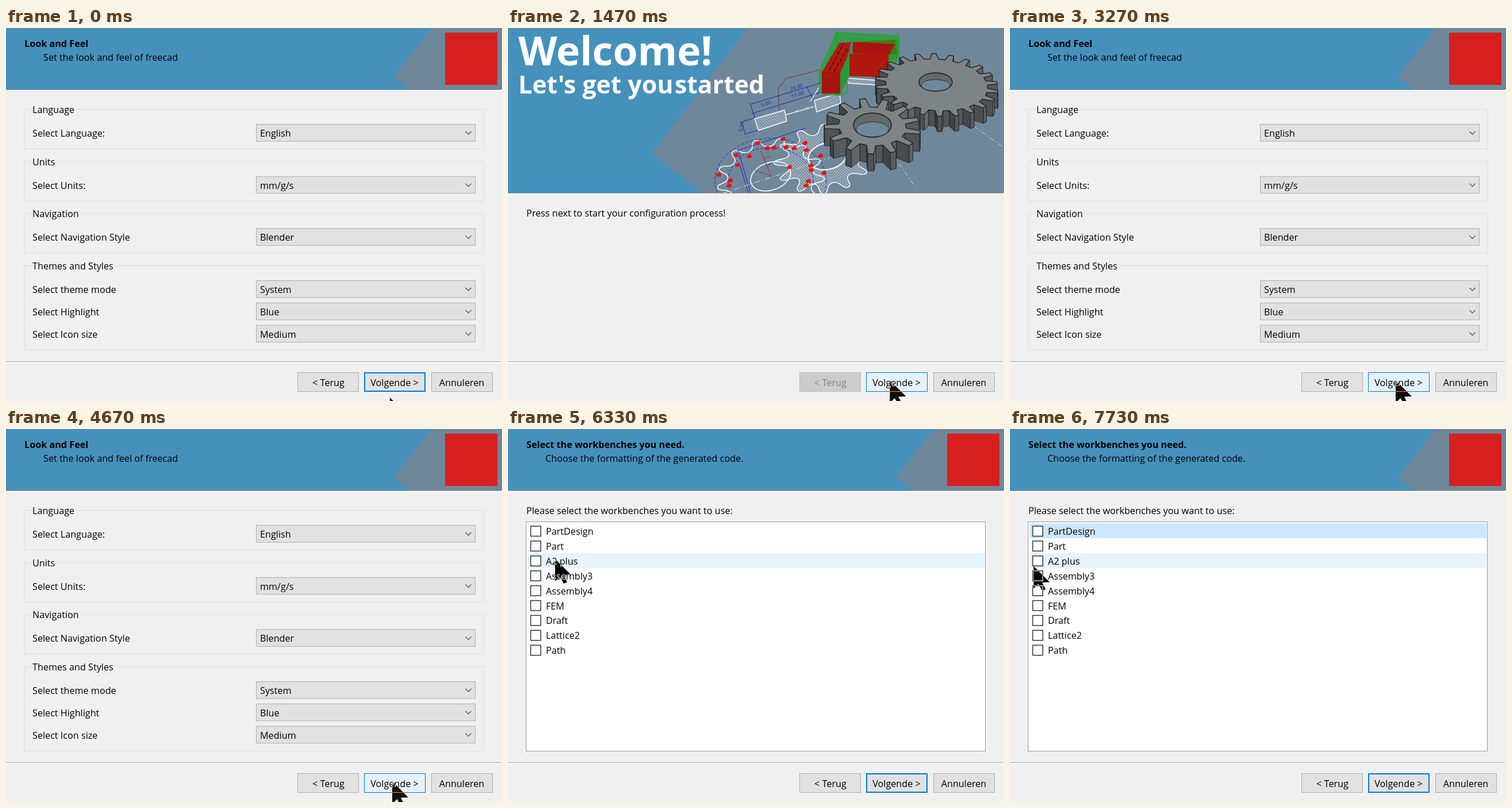
Animation, 863 px wide and 649 px high, one loop 8000 ms. Source, as an HTML page:

```html
<!DOCTYPE html>
<html lang="en">
<head>
<meta charset="utf-8">
<title>Setup wizard</title>
<style>
  html, body { margin: 0; width: 100%; height: 100%; overflow: hidden; background: #f0f0f0; }
  svg { display: block; width: 863px; height: 649px; }
  text { font: 16.2px "Open Sans", "Noto Sans", sans-serif; white-space: pre; }
  .bold { font-weight: 700; }
  .banner { font-weight: 700; fill: #fff; }
  .title { stroke: #f0f0f0; stroke-width: 7px; paint-order: stroke; }
  .dim { font-size: 9px; fill: #2525b0; }
  .mid { text-anchor: middle; }
  #cursor { mix-blend-mode: difference; }
</style>
</head>
<body>
<svg id="stage" viewBox="0 0 863 649"></svg>
<script>
const LOOP = 8000;
const stage = document.getElementById('stage');
const $ = id => document.getElementById(id);

const rect = (x, y, w, h, fill, extra = '') =>
  `<rect x="${x}" y="${y}" width="${w}" height="${h}" fill="${fill}" ${extra}/>`;
const path = (d, fill, stroke = 'none', width = 1, extra = '') =>
  `<path d="${d}" fill="${fill}" stroke="${stroke}" stroke-width="${width}" ${extra}/>`;
const text = (x, y, s, attrs = '') =>
  `<text x="${x}" y="${y}" ${attrs}>${s.replace(/</g, '&lt;')}</text>`;
const poly = pts => 'M' + pts.map(p => p.map(v => v.toFixed(1)).join(' ')).join('L') + 'Z';
const line = (d, color, width = 1, dash = '') =>
  path(d, 'none', color, width, dash && `stroke-dasharray="${dash}"`);
const ellipse = (x, y, rx, ry, fill, stroke, width, extra = '') =>
  `<ellipse cx="${x}" cy="${y}" rx="${rx}" ry="${ry}" fill="${fill}" stroke="${stroke}" stroke-width="${width}" ${extra}/>`;
const rule = y => rect(0, y, 861, 1, '#a0a0a0') + rect(0, y + 1, 861, 1.5, '#fff');

// Gear outline on a tilted ellipse: root, two tip points, root for each tooth.
function gearPoints(cx, cy, rx, ry, teeth, root, tilt, phase = 0) {
  const pts = [], c = Math.cos(tilt), s = Math.sin(tilt);
  const profile = [[-.28, root], [-.13, 1], [.13, 1], [.28, root]];
  for (let i = 0; i < teeth; i++) {
    for (const [offset, r] of profile) {
      const a = (i + offset + phase) / teeth * 2 * Math.PI;
      const u = rx * r * Math.cos(a), v = ry * r * Math.sin(a);
      pts.push([cx + u * c - v * s, cy + u * s + v * c]);
    }
  }
  return pts;
}

function smooth(pts) {
  const mid = (a, b) => [(a[0] + b[0]) / 2, (a[1] + b[1]) / 2].map(v => v.toFixed(1)).join(' ');
  return `M${mid(pts[pts.length - 1], pts[0])}` +
    pts.map((p, i) => `Q${p[0].toFixed(1)} ${p[1].toFixed(1)} ${mid(p, pts[(i + 1) % pts.length])}`).join('') + 'Z';
}

function solidGear(pts, depth, hole) {
  const walls = pts.map((a, i) => {
    const b = pts[(i + 1) % pts.length];
    const slope = (b[1] - a[1]) / Math.hypot(b[0] - a[0], b[1] - a[1]);
    const g = Math.round(82 + 26 * slope);
    const quad = poly([a, b, [b[0], b[1] + depth], [a[0], a[1] + depth]]);
    return { y: a[1] + b[1], svg: path(quad, `rgb(${g},${g + 3},${g + 5})`, '#222527', 1) };
  }).sort((a, b) => a.y - b.y);
  const [x, y, rx, ry] = hole;
  return walls.map(w => w.svg).join('') +
    path(poly(pts), '#7e8386', '#1f2224', 1.3, 'stroke-linejoin="round"') +
    ellipse(x, y, rx, ry, '#65696c', '#1b1d1f', 1.5) +
    ellipse(x, y + ry * .35, rx * .86, ry * .62, '#6f879b', '#2a2d30', 1);
}

function sketch() {
  const dots = [[366, 256], [386, 266], [384, 275], [399, 239], [396, 222], [419, 224], [434, 201],
    [450, 210], [462, 209], [478, 194], [483, 208], [497, 210], [516, 201], [518, 213], [543, 223],
    [526, 240], [527, 248], [549, 253], [522, 267], [518, 275], [489, 243]];
  const ring = gearPoints(457, 262, 94, 70, 13, .8, -.1, .3);
  return ellipse(457, 266, 97, 74, 'none', '#2222b8', 1, 'stroke-dasharray="5 3"') +
    ellipse(457, 266, 74, 58, 'none', '#2222b8', 1, 'stroke-dasharray="4 3"') +
    line(smooth(ring), '#fff', 1.5) +
    ellipse(457, 258, 36, 24, 'none', '#fff', 1.5, 'transform="rotate(-20 457 258)"') +
    line('M400 213L518 174M400 211L422 287M404 240L418 287', '#2222b8') +
    line('M375 287L560 226', '#dfe5ea', 1, '9 4 2 4') +
    line('M440 214L458 258L430 247M446 226l12 -3M448 240l10 -4', '#a62d38', 1.2, '4 1') +
    path(dots.map(([x, y]) => `M${x - 3} ${y + 1}l5 -3l1 4`).join(''), 'none', '#f01010', 5, 'stroke-linejoin="round"');
}

function pocket() {
  let s = path('M545 113V76L574 24L676 20L678 52L664 56V86L594 84L578 117Z', '#4d8060') +
    path('M600 25L674 20L677 44L664 47L600 44Z', '#a8140d') +
    path('M594 45H663V87L594 83Z', '#bf1b10');
  for (let i = 0; i < 10; i++) {
    const y = i * 4;
    s += line(`M542 ${74 + y}L572 ${7 + y}V${7 + y * .4}L680 ${13 + y * .4}`, '#18a821', 1.1);
    s += line(`M664 ${48 + y}L680 ${14 + y}M578 ${78 + y}L593 ${45 + y}`, '#18a821', 1.1);
  }
  s += path('M546 77L577 26L597 25L592 46L578 79V113L546 114Z', '#b3180f');
  for (let y = 0; y < 38; y += 4) s += line(`M546 ${78 + y}H578M594 ${47 + y}H663`, '#741009', .8);
  return s + line('M542 74V112M572 7V22M680 13V52M663 45V87M592 45L590 112L578 117H546', '#18a821', 1.4) +
    line('M559 73L584 27M567 76L591 35', '#300c08', 1.5, '7 3');
}

function artwork() {
  const hatched = d => path(d, 'url(#hatch)', '#fff', 1.4);
  const dims = [[441, 137, '6.00', -17], [492, 109, '26.00', -17], [494, 122, '11.00', -17], [407, 181, '5.50', -75]];
  return line('M482 151L534 134M680 236L712 281M795 160L863 208', '#d7dfe5', 1, '8 4 2 4') +
    line('M472 142L470 106L484 88L545 72', '#8d3039', 1.2, '6 1') +
    line('M421 133L556 92M424 149L553 109M406 164L413 184M404 164L430 156M411 185L437 177M421 131L430 158M519 101L534 130', '#2222b8') +
    dims.map(([x, y, s, r]) => text(x, y, s, `class="dim" transform="rotate(${r} ${x} ${y})"`)).join('') +
    hatched('M429 158L481 143L485 162L436 178Z') + hatched('M533 126L577 113L579 131L537 146Z') +
    hatched('M590 87L640 91V99L592 96Z') + line('M526 128L546 96L556 113M484 151L533 137', '#fff', 1.2) +
    hatched(smooth(gearPoints(549, 228, 87, 60, 12, .73, -.15, .2))) +
    ellipse(556, 223, 34, 23, '#6f879b', '#fff', 2, 'transform="rotate(-14 556 223)"') +
    sketch() + pocket() +
    solidGear(gearPoints(746, 99, 107, 54, 22, .83, .08, .2), 27, [744, 94, 29, 16]) +
    solidGear(gearPoints(634, 171, 84, 48, 13, .7, .06, .25), 30, [634, 169, 33, 21]);
}

const welcomePage = () => `<g id="welcome">` +
  rect(0, 0, 863, 287, '#4591bc') + path('M417 0L250 219L339 287H863V0Z', '#6f879b') +
  `<g clip-path="url(#bannerClip)">${artwork()}</g>` +
  text(18, 65, 'Welcome!', 'class="banner" style="font-size:69.8px"') +
  text(18, 114, "Let's get you", 'class="banner" style="font-size:42.8px"') +
  text(290, 114, 'started', 'class="banner" style="font-size:42.8px"') +
  rule(287) +
  text(32, 328, 'Press next to start your configuration process!') + '</g>';

const header = () => `<g id="header">` +
  rect(0, 0, 863, 107, '#4591bc') + path('M741 0L675 84L703 107H863V0Z', '#6f879b') +
  rect(764, 8, 91, 91, '#d6201f') + rule(107) +
  text(32, 33, '', 'id="heading" class="bold"') + text(65, 57, '', 'id="subheading"') + '</g>';

const combo = (y, label, value) =>
  text(46, y + 22, label) +
  rect(435.5, y + .5, 381, 29.5, '#e1e1e1', 'stroke="#adadad"') +
  text(442, y + 22, value) + rect(440, y + 26, 120, 3, '#e1e1e1') +
  line(`M799.5 ${y + 13}l5 5l5 -5`, '#444', 1.2);

const group = (y, height, title, rows) =>
  rect(32, y + .5, 799, height, 'none', 'stroke="#dcdcdc"') +
  text(46, y + 7, title, 'class="title"') +
  rows.map(([label, value], i) => combo(y + 26 + i * 38.8, label, value)).join('');

const lookPage = () => `<g id="look">` +
  group(141, 69, 'Language', [['Select Language:', 'English']]) +
  group(231.7, 69, 'Units', [['Select Units:', 'mm/g/s']]) +
  group(322.3, 69, 'Navigation', [['Select Navigation Style', 'Blender']]) +
  group(413, 146.5, 'Themes and Styles', [
    ['Select theme mode', 'System'], ['Select Highlight', 'Blue'], ['Select Icon size', 'Medium']]) + '</g>';

const ROWS = ['PartDesign', 'Part', 'A2 plus', 'Assembly3', 'Assembly4', 'FEM', 'Draft', 'Lattice2', 'Path'];
const ROW_TOP = 164, ROW_STEP = 25.9;

const benchPage = () => `<g id="bench">` +
  text(32, 148, 'Please select the workbenches you want to use:') +
  rect(31.5, 161.5, 799, 399, '#fff', 'stroke="#9a9a9a"') +
  ROWS.map((name, i) => {
    const y = ROW_TOP + i * ROW_STEP;
    return rect(34, y, 795, 26, 'none', `id="row${i}"`) +
      rect(39.5, y + 5, 17.5, 17.5, '#fff', 'stroke="#333" stroke-width="1.5"') +
      text(66, y + 20, name);
  }).join('') + '</g>';

const BUTTONS = {
  back: { x: 507, label: '< Terug', labelX: 561 },
  next: { x: 623, label: 'Volgende >', labelX: 676 },
  cancel: { x: 740, label: 'Annuleren', labelX: 793 }
};

const button = id => `<g id="${id}"><rect/>` +
  text(BUTTONS[id].labelX, 623, BUTTONS[id].label, 'class="mid"') + '</g>';

// The border lies inside the 107 by 34 box of the button.
function paint(id, fill, stroke, border) {
  const box = $(id).firstElementChild;
  const attrs = {
    x: BUTTONS[id].x + border / 2, y: 599 + border / 2, width: 107 - border, height: 34 - border,
    fill, stroke, 'stroke-width': border
  };
  for (const name in attrs) box.setAttribute(name, attrs[name]);
}

stage.innerHTML = `<defs>
    <pattern id="hatch" width="3.5" height="3.5" patternUnits="userSpaceOnUse" patternTransform="rotate(40)">
      <path d="M0 0V3.5M0 0H3.5" stroke="#e4eaee" stroke-width="1"/></pattern>
    <clipPath id="bannerClip"><rect width="863" height="287"/></clipPath></defs>` +
  rect(0, 0, 863, 649, '#f0f0f0') + header() + welcomePage() + lookPage() + benchPage() + rule(580) +
  Object.keys(BUTTONS).map(button).join('') +
  path('M0 0V39L8.5 31L15 43L21 40.5L15 28.5L28 28Z', '#fff', 'none', 0, 'id="cursor"');
paint('cancel', '#e1e1e1', '#adadad', 1);

// Each key: time, then the values reached at that time.
const CURSOR = [
  [0, 668, 643], [300, 585, 613], [733, 585, 613], [1533, 666, 613], [2200, 666, 613], [2333, 671, 613],
  [4600, 671, 613], [4666, 672, 613], [6000, 672, 613], [6333, 82, 226], [6400, 21, 204], [6466, 27, 199],
  [6600, 27, 199], [7000, 46, 176], [7400, 46, 176], [7733, 41, 238.5]];
const IDLE = [225, 225, 225], HOVER = [229, 241, 251], DOWN = [204, 228, 247];
const NEXT_FILL = [
  [0, ...IDLE], [1130, ...IDLE], [1470, ...HOVER], [2667, ...HOVER], [2800, ...DOWN], [2933, ...DOWN],
  [3266, ...HOVER], [5333, ...HOVER], [5400, ...DOWN], [5466, ...DOWN], [5733, ...HOVER],
  [6000, ...HOVER], [6333, ...IDLE]];

function sample(keys, t) {
  const i = keys.findIndex(k => k[0] > t);
  if (i < 0) return keys[keys.length - 1].slice(1);
  const a = keys[i - 1], b = keys[i], u = (t - a[0]) / (b[0] - a[0]);
  const e = u * u * (3 - 2 * u);
  return a.slice(1).map((v, j) => v + (b[j + 1] - v) * e);
}

const show = (id, on) => $(id).setAttribute('display', on ? 'inline' : 'none');

function update(time) {
  const t = Math.floor((time + 5) * .015) / .015; // 15 steps per second
  const page = t < 399 ? 'look' : t < 2932 ? 'welcome' : t < 5466 ? 'look' : 'bench';
  const [x, y] = sample(CURSOR, t);

  for (const id of ['welcome', 'look', 'bench']) show(id, id === page);
  show('header', page !== 'welcome');
  $('heading').textContent = page === 'bench' ? 'Select the workbenches you need.' : 'Look and Feel';
  $('subheading').textContent = page === 'bench'
    ? 'Choose the formatting of the generated code.' : 'Set the look and feel of freecad';

  const disabled = page === 'welcome';
  const overBack = x >= 507 && x <= 613 && y >= 600 && y <= 633;
  if (disabled) paint('back', '#ccc', '#bfbfbf', 1);
  else if (overBack) paint('back', '#e5f1fb', '#0078d7', 1);
  else paint('back', '#e1e1e1', '#adadad', 1);
  $('back').lastElementChild.setAttribute('fill', disabled ? '#838383' : '#000');

  const fill = sample(NEXT_FILL, t).map(Math.round);
  paint('next', `rgb(${fill})`, '#0078d7', fill[2] > 225 ? 1 : 2);

  const hovered = x >= 34 && x <= 829 ? Math.floor((y - ROW_TOP) / ROW_STEP) : -1;
  ROWS.forEach((_, i) => {
    const selected = i === 0 && t > 7332;
    $('row' + i).setAttribute('fill', selected ? '#cce8ff' : i === hovered ? '#e5f3ff' : 'none');
  });
  $('cursor').setAttribute('transform', `translate(${x.toFixed(1)} ${y.toFixed(1)})`);
}

const start = performance.now();
function frame() {
  update((performance.now() - start) % LOOP);
  requestAnimationFrame(frame);
}
update(0);
requestAnimationFrame(frame);
</script>
</body>
</html>
```
